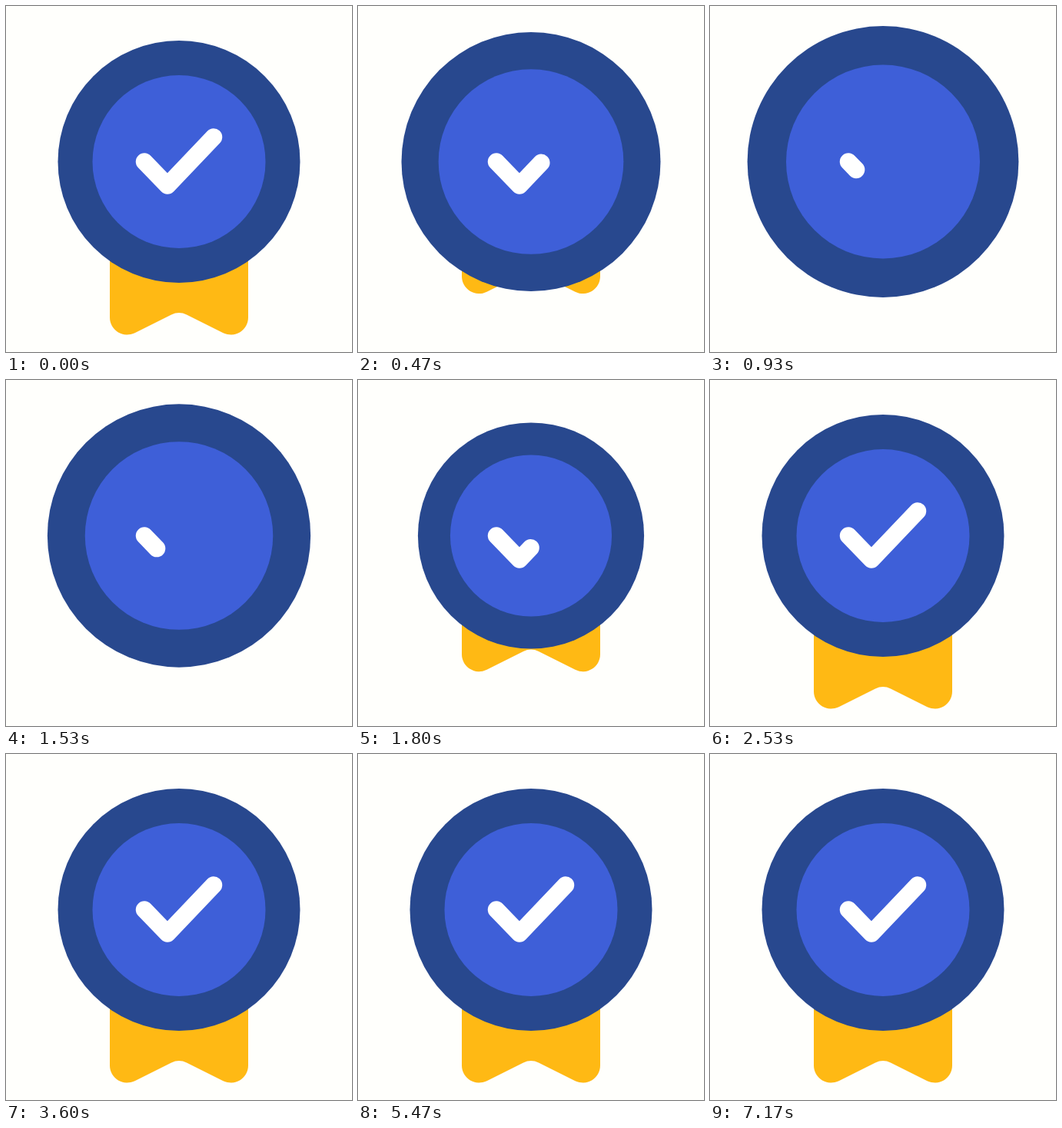
Animation, 450 px wide and 450 px high, one loop 7210 ms. Source, as an HTML page:

```html
<!DOCTYPE html>
<html lang="en">
<head>
<meta charset="utf-8">
<title>Award badge</title>
<style>
  html, body { margin: 0; width: 100%; height: 100%; overflow: hidden; background: #fffffc; }
  svg { display: block; width: 100vw; height: 100vh; }
</style>
</head>
<body>
<svg viewBox="0 0 450 450">
  <path id="ribbon" fill="#ffb914" d="M135 202.5V405A22.5 22.5 0 0 0 167.5 425.2L215 401.4A22.5 22.5 0 0 1 235 401.4L282.5 425.2A22.5 22.5 0 0 0 315 405V202.5Z"/>
  <g id="medal">
    <circle r="157.5" fill="#28488e"/>
    <circle r="112.5" fill="#3e5fd8"/>
  </g>
  <path id="tick" d="M180 202.5L210 233.5L270 170.5" pathLength="1" fill="none" stroke="#fff"
    stroke-width="22.5" stroke-linecap="round" stroke-linejoin="round"/>
</svg>
<script>
  const LOOP = 7210;
  const RISE = 850;     // medal swells, ribbon tucks in
  const RETURN = 1400;  // medal and ribbon start back
  const BOUNCE = 533;   // each half of the medal's dip
  const ERASE = 1175;   // tick fully gone
  const REDRAW = 1212;  // tick starts to draw again

  const [ribbon, medal, tick] =
    ['ribbon', 'medal', 'tick'].map(id => document.getElementById(id));

  // Smooth 0 to 1 between two times
  function ramp(t, from, to) {
    const p = Math.min(1, Math.max(0, (t - from) / (to - from)));
    return p * p * (3 - 2 * p);
  }

  function draw(t) {
    const dip = RETURN + BOUNCE;
    const swell = ramp(t, 0, RISE);
    const scale = 1 + 0.12 * swell - 0.22 * ramp(t, RETURN, dip) + 0.1 * ramp(t, dip, dip + BOUNCE);
    const lift = 92 * (swell - ramp(t, RETURN, RETURN + RISE - 20));
    const drawn = 1 - ramp(t, 0, ERASE) + ramp(t, REDRAW, 2400);

    medal.setAttribute('transform', `translate(225 202.5) scale(${scale})`);
    ribbon.setAttribute('transform', `translate(0 ${-lift})`);
    tick.setAttribute('stroke-dasharray', drawn < 1 ? `${drawn} 2` : 'none');
    tick.setAttribute('visibility', drawn > 0.001 ? 'visible' : 'hidden');
  }

  const start = performance.now();
  function frame() {
    draw((performance.now() - start) % LOOP);
    requestAnimationFrame(frame);
  }
  frame();
</script>
</body>
</html>
```
